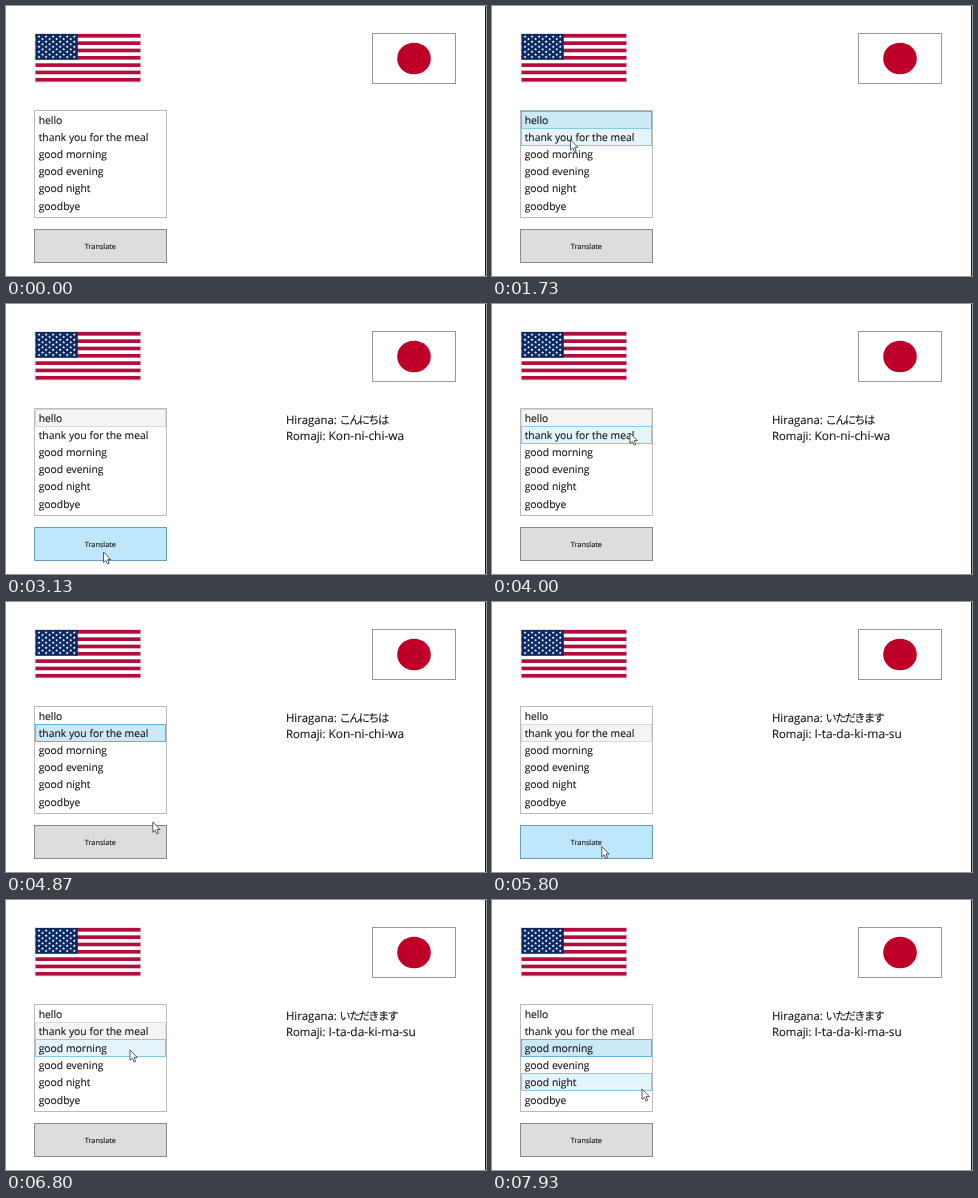
Write an HTML page that moves like this. It is 480x270 px and loops after 8000 ms.

```html
<!DOCTYPE html>
<html lang="en">
<head>
<meta charset="utf-8">
<title>Phrase translator</title>
<style>
  html, body { margin: 0; width: 100%; height: 100%; overflow: hidden; background: #fff; }
  svg { display: block; width: 100vw; height: 100vh; }
  text {
    font-family: "Open Sans", "Noto Sans", sans-serif; text-rendering: geometricPrecision;
    fill: #161616; stroke: #161616; stroke-width: .12px;
  }
  .phrase { font-size: 10.35px; }
  .label { font-size: 11.35px; }
  .romaji { font-size: 11.95px; }
  .kana { font-family: "Noto Sans CJK JP", "Noto Sans CJK", sans-serif; font-size: 11.2px; letter-spacing: -1.6px; }
  .row { fill: none; stroke: none; }
  .row.hover { fill: #e5f3fb; stroke: #86c9ea; }
  .row.inactive { fill: #f4f4f4; stroke: #dadada; }
  .row.active { fill: #cbe8f6; stroke: #5fb5e0; }
  .button { fill: #ddd; stroke: #8a8a8a; }
  .button.hover { fill: #bee6fd; stroke: #6b9cbe; }
  .button.pressed { fill: #c4e5f6; stroke: #5a86a3; }
  .caption { font-size: 7.3px; text-anchor: middle; }
</style>
</head>
<body>
<svg viewBox="0 0 480 270" xmlns="http://www.w3.org/2000/svg">
  <rect width="480" height="270" fill="#fff"/>
  <rect x="479" width="1" height="270" fill="#1c1c1c"/>

  <g transform="translate(29.5 28)">
    <rect x="-.5" y="-.5" width="105.7" height="48.6" fill="#fff" stroke="#dcdcdc" stroke-width=".8"/>
    <g id="stripes" fill="#b20d3c"></g>
    <rect width="42.3" height="25.6" fill="#0b2a63"/>
    <g id="stars" fill="#fff"></g>
  </g>

  <rect x="366.5" y="27.5" width="83" height="50" fill="#fff" stroke="#999"/>
  <ellipse cx="408" cy="52.5" rx="16.8" ry="15.8" fill="#be0029"/>

  <rect x="28.5" y="104.5" width="132" height="107" fill="#fff" stroke="#b9bbbf"/>
  <g id="list"></g>

  <rect id="button" class="button" x="28.5" y="223.5" width="132" height="33"/>
  <text class="caption" x="94.4" y="242.8">Translate</text>

  <g id="answer">
    <text class="label" x="280" y="119.8">Hiragana:</text>
    <text class="kana" id="kana" lang="ja" x="333.6" y="120.2"></text>
    <text class="label" x="280" y="136">Romaji:</text>
    <text class="romaji" id="romaji" x="322.5" y="136"></text>
  </g>

  <path id="cursor" d="M0 0V10.4L2.3 8.3L4 12L5.7 11.2L4.1 7.6H7.3Z" fill="#fff" stroke="#333" stroke-width=".8" stroke-linejoin="round"/>
</svg>
<script>
const LOOP = 8000, FPS = 15;
const ROW_TOP = 105.3, ROW_H = 17.1;
const phrases = ["hello", "thank you for the meal", "good morning", "good evening", "good night", "goodbye"];
const answers = [["こんにちは", "Kon-ni-chi-wa"], ["いただきます", "I-ta-da-ki-ma-su"]];
const $ = id => document.getElementById(id);

function add(parent, tag, attrs, text = "") {
  const el = document.createElementNS("http://www.w3.org/2000/svg", tag);
  for (const key in attrs) el.setAttribute(key, attrs[key]);
  el.textContent = text;
  parent.appendChild(el);
  return el;
}

// Flag stripes and stars
const stripeH = 47.6 / 13;
for (let i = 0; i < 13; i += 2) {
  add($("stripes"), "rect", { y: i * stripeH, width: 104.9, height: stripeH });
}
function star(cx, cy, r) {
  return Array.from({ length: 10 }, (_, i) => {
    const a = i * Math.PI / 5, d = i % 2 ? r * .45 : r;
    return `${cx + d * Math.sin(a)},${cy - d * Math.cos(a)}`;
  }).join(" ");
}
for (let r = 0; r < 9; r++) {
  for (let c = 0; c < 6 - r % 2; c++) {
    const x = (2 * c + 1 + r % 2) * 42.3 / 12, y = (r + 1) * 2.56;
    add($("stars"), "polygon", { points: star(x, y, 1.55) });
  }
}

const rows = phrases.map((phrase, i) => {
  const y = ROW_TOP + i * ROW_H;
  const box = add($("list"), "rect", { x: 29.5, y: Math.floor(y) + .5, width: 130, height: 17 });
  add($("list"), "text", { class: "phrase", x: 32.7, y: y + 12.7 }, phrase);
  return box;
});

// Each leg eases the pointer to a place; bow swings it out to the right
const home = { x: 69, y: 139 };
const legs = [
  { from: 600, to: 1000, x: 76, y: 113 },
  { from: 1525, to: 2400, x: 93, y: 253 },
  { from: 2600, to: 3130, x: 97.5, y: 248 },
  { from: 3270, to: 4000, x: 138, y: 129, bow: 38 },
  { from: 4400, to: 5070, x: 109.8, y: 244.5, bow: 50 },
  { from: 6100, to: 6800, x: 124, y: 150 },
  { from: 7600, to: 7930, x: 150, y: 189 }
];
// A click on a row selects it, a click on the button translates it
const clicks = [{ at: 930, row: 0 }, { at: 2600 }, { at: 4330, row: 1 }, { at: 5330 }, { at: 7400, row: 2 }];
const PRESS = 70;

function pointerAt(t) {
  let { x, y } = home;
  for (const leg of legs) {
    if (t < leg.from) break;
    const u = Math.min(1, (t - leg.from) / (leg.to - leg.from));
    const k = u * u * (3 - 2 * u);
    x += (leg.x - x) * k + (leg.bow || 0) * Math.sin(Math.PI * k);
    y += (leg.y - y) * k;
  }
  return { x, y };
}

function stateAt(t) {
  const s = { selected: -1, focus: "", answer: null, down: false };
  for (const { at, row } of clicks) {
    if (t < at) break;
    if (row !== undefined) {
      s.selected = row;
      s.focus = "active";
    } else {
      s.focus = "inactive";
      s.down = t < at + PRESS;
      if (!s.down) s.answer = answers[s.selected];
    }
  }
  return s;
}

function draw(time) {
  // The screen refreshes at a fixed rate; 4 ms absorbs rounding
  const t = Math.floor((time % LOOP + 4) * FPS / 1000) * 1000 / FPS + 4;
  const { x, y } = pointerAt(t);
  const { selected, focus, answer, down } = stateAt(t);
  const visible = t >= legs[0].from;
  const inside = visible && x >= 28 && x <= 160;
  const hovered = inside ? Math.floor((y - ROW_TOP) / ROW_H) : -1;
  const over = inside && y >= 223 && y <= 257;

  rows.forEach((row, i) => {
    const look = i === selected ? focus : i === hovered ? "hover" : "";
    row.setAttribute("class", "row " + look);
  });
  $("button").setAttribute("class", "button" + (down ? " pressed" : over ? " hover" : ""));

  $("answer").style.display = answer ? "" : "none";
  if (answer) [$("kana").textContent, $("romaji").textContent] = answer;

  $("cursor").style.display = visible ? "" : "none";
  $("cursor").setAttribute("transform", `translate(${x} ${y})`);
}

const start = performance.now();
function tick(now) {
  draw(Math.max(0, now - start));
  requestAnimationFrame(tick);
}
draw(0);
requestAnimationFrame(tick);
</script>
</body>
</html>
```
